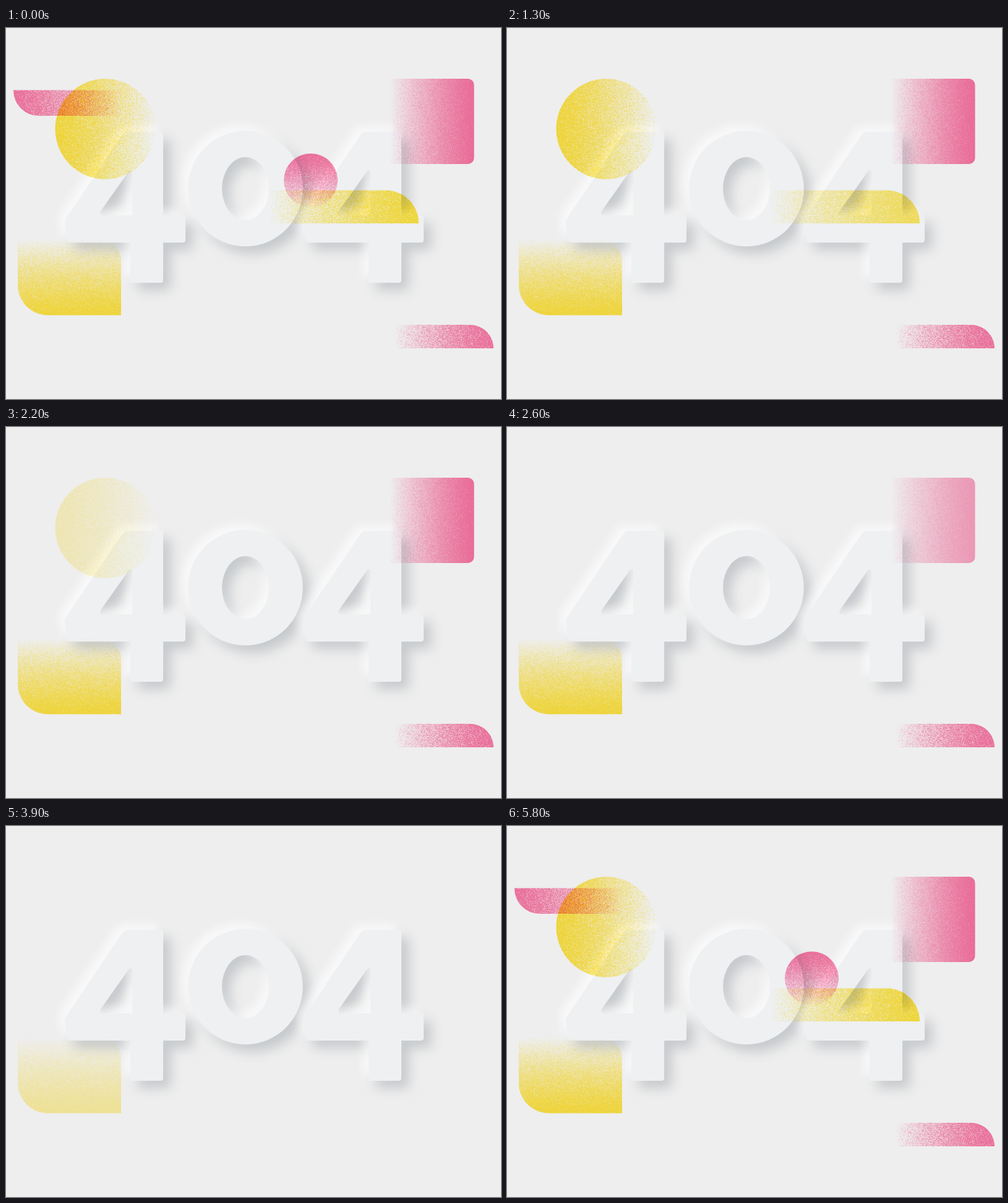
Animation of 800 by 600 pixels, one loop 5.9 s. Source, as an HTML page with a canvas:

```html
<!DOCTYPE html>
<html lang="en">
<head>
<meta charset="utf-8">
<title>404</title>
<style>
  html, body { margin: 0; height: 100%; overflow: hidden; background: #eee; }
  canvas { display: block; }
</style>
</head>
<body>
<canvas id="stage" width="800" height="600"></canvas>
<script>
const W = 800, H = 600, LOOP = 5900, STEP = 100;
const YELLOW = [255, 226, 50], PINK = [250, 112, 160];
const ctx = document.getElementById('stage').getContext('2d');
const clamp = v => Math.min(1, Math.max(0, v));

let seed = 404;
function random() {
  seed = (seed + 0x6D2B79F5) | 0;
  let n = Math.imul(seed ^ (seed >>> 15), 1 | seed);
  n = (n + Math.imul(n ^ (n >>> 7), 61 | n)) ^ n;
  return ((n ^ (n >>> 14)) >>> 0) / 4294967296;
}

function newLayer(w, h) {
  const canvas = document.createElement('canvas');
  canvas.width = w;
  canvas.height = h;
  return canvas.getContext('2d');
}

// Listed in the order in which they fade out. `dense` is the solid side,
// `peak` its density, radii run clockwise from the top left corner.
const shapes = [
  { x: 12, y: 100.5, w: 174, h: 41.5, radii: [0, 0, 0, 41], color: PINK, dense: 'left', peak: .9, grain: .38 },
  { x: 449, y: 203, w: 87, h: 87, radii: 43.5, color: PINK, dense: 'top', peak: .93, grain: .3 },
  { x: 424, y: 262.5, w: 243, h: 53.5, radii: [0, 53, 0, 0], color: YELLOW, dense: 'right', peak: .9, grain: .42 },
  { x: 79.5, y: 82, w: 162, h: 162.5, radii: 81, color: YELLOW, dense: 'left', peak: .9, grain: .4 },
  { x: 620, y: 82, w: 136.5, h: 138, radii: [0, 10, 10, 0], color: PINK, dense: 'right', peak: .97, grain: .18 },
  { x: 628, y: 480, w: 160, h: 38, radii: [0, 38, 0, 0], color: PINK, dense: 'right', peak: .92, grain: .38 },
  { x: 19, y: 342, w: 167, h: 122.5, radii: [0, 34, 0, 49], color: YELLOW, dense: 'bottom', peak: .92, grain: .28 }
];

function paintGrain({ x, y, w, h, radii, color, dense, peak, grain }) {
  const left = Math.floor(x), top = Math.floor(y);
  const cols = Math.ceil(w) + 1, rows = Math.ceil(h) + 1;
  const layer = newLayer(cols, rows);
  const image = layer.createImageData(cols, rows);
  for (let i = 0; i < cols * rows; i++) {
    const u = (i % cols) / cols, v = Math.floor(i / cols) / rows;
    const far = { left: u, right: 1 - u, top: v, bottom: 1 - v }[dense];
    const density = peak * (1 - far ** 1.35);
    const speck = random() < density ? 1 : 0;
    image.data.set([...color, 255 * (density + (speck - density) * grain)], i * 4);
  }
  layer.putImageData(image, 0, 0);
  layer.globalCompositeOperation = 'destination-in';
  layer.beginPath();
  layer.roundRect(x - left, y - top, w, h, radii);
  layer.fill();
  return { canvas: layer.canvas, left, top };
}

function paintNumber() {
  const layer = newLayer(W, H);
  const four = new Path2D(
    'M197 168H250Q254 168 254 172V303H286Q290 303 290 307V343Q290 347 286 347H254V408' +
    'Q254 412 250 412H201V347H104Q100 347 99 343L95 317Q94 312 97 308L188 173Q192 168 197 168Z' +
    'M204 303V234Q204 228 199 231L153 296Q150 303 156 303Z');
  const number = new Path2D();
  number.addPath(four);
  number.addPath(four, new DOMMatrix().translate(385, 0));
  for (const [rx, ry] of [[92.7, 93.5], [38, 51]]) {
    number.moveTo(387 + rx, 259.8);
    number.ellipse(387, 259.8, rx, ry, 0, 0, 2 * Math.PI);
  }

  layer.fillStyle = '#eee';
  layer.fillRect(0, 0, W, H);
  layer.fillStyle = '#eef0f2';
  for (const [color, offset, blur] of [['#c6c9cc', 12, 19], ['rgba(255,255,255,.66)', -9, 15]]) {
    // The body is cast from off stage so that only its shadow lands here.
    layer.save();
    layer.shadowColor = color;
    layer.shadowBlur = blur;
    layer.shadowOffsetX = offset + 2 * W;
    layer.shadowOffsetY = offset;
    layer.translate(-2 * W, 0);
    layer.fill(number, 'evenodd');
    layer.restore();
  }
  layer.fill(number, 'evenodd');
  return layer.canvas;
}

const number = paintNumber();
const grains = shapes.map(paintGrain);

function draw(now) {
  const tick = Math.floor((now % LOOP) / STEP);
  const fadeIn = clamp((tick - 48) / 10) ** 2.5;
  ctx.globalCompositeOperation = 'source-over';
  ctx.globalAlpha = 1;
  ctx.drawImage(number, 0, 0);
  ctx.globalCompositeOperation = 'multiply';
  grains.forEach(({ canvas, left, top }, i) => {
    const fadeOut = clamp(1 - (tick - 6 * i) / 6);
    ctx.globalAlpha = Math.max(fadeOut, fadeIn);
    ctx.drawImage(canvas, left, top);
  });
}

function frame() {
  draw(performance.now());
  requestAnimationFrame(frame);
}
frame();
</script>
</body>
</html>
```
